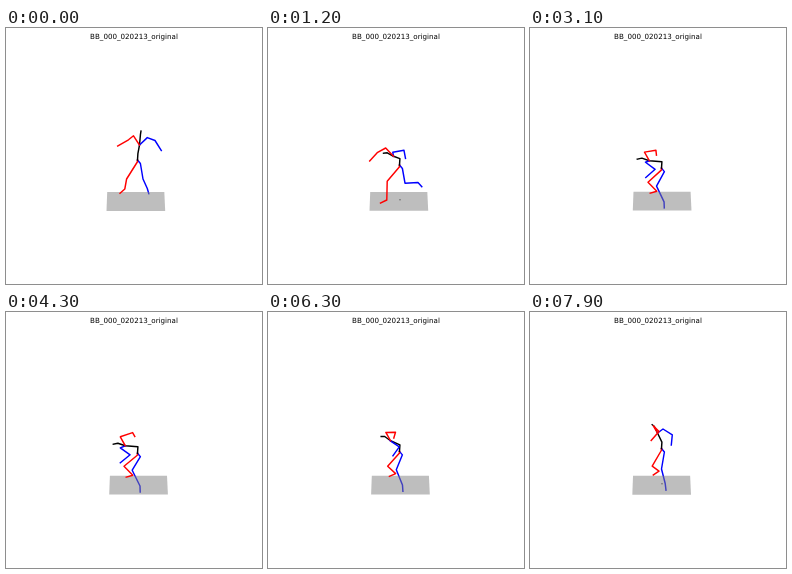
Animation of 256 by 256 pixels, one loop 8 s. Source, as an HTML page:

```html
<!DOCTYPE html>
<html lang="en">
<head>
<meta charset="utf-8">
<title>Skeleton motion</title>
<style>
  html, body { margin: 0; width: 100%; height: 100%; overflow: hidden; background: #fff; }
  svg { display: block; width: 100vw; height: 100vh; }
  text { font: 7.13px "DejaVu Sans", sans-serif; text-anchor: middle; }
  polyline { fill: none; stroke-width: 1.45; stroke-linejoin: round; stroke-linecap: square; }
  .left { stroke: #00f; }
  .right { stroke: #f00; }
  .mid { stroke: #000; }
</style>
</head>
<body>
<svg viewBox="0 0 256 256">
  <text x="128" y="10.6">BB_000_020213_original</text>
  <polyline id="leftLeg" class="left"/>
  <polygon id="ground" points="101.2,164.1 158.3,164.1 159.2,182.9 100.5,182.9" fill="#808080" fill-opacity=".51"/>
  <path id="trail" d="M131 171.8h2" stroke="#555" stroke-width=".7"/>
  <polyline id="rightLeg" class="right"/>
  <polyline id="torso" class="mid"/>
  <polyline id="leftArm" class="left"/>
  <polyline id="rightArm" class="right"/>
</svg>
<script>
const LOOP = 8000, STEP = 100;

// Neck hangs on the pelvis, head and arms on the neck; legs are in stage units.
// Arms run shoulder, elbow, hand; legs run knee, ankle, toe.
const stand = {
  pelvis: [131.5, 132], neck: [2, -15], head: [1.5, -14],
  rightArm: [-6, -9.2, -11, -5.2, -21.8, 1],
  leftArm: [7.8, -7.4, 15.5, -4.5, 21.8, 5.5],
  rightLeg: [120.6, 151, 118.8, 161, 114, 165.3],
  leftLeg: [137, 151, 141.3, 160.5, 142.8, 165.7]
};
const stride = {
  pelvis: [131.5, 137], neck: [-6, -8.7], head: [-10, -3],
  rightArm: [-7.8, -8.3, -16.3, -3.6, -23.8, 4.7],
  leftArm: [-0.7, -4, 10.5, -6, 12, 2.2],
  rightLeg: [119.2, 153.2, 118.8, 172, 112.5, 175],
  leftLeg: [137, 155.2, 150, 154.5, 153.8, 158.7]
};
const crouch = {
  pelvis: [131.5, 141.2], neck: [-12.2, -7.4], head: [-12, -1.6],
  rightArm: [-5, -9, 7.3, -13.2, 9.5, -9.3],
  leftArm: [-5, 2, 4.8, 9, -5, 17],
  rightLeg: [118, 154.3, 126.8, 163.2, 120.2, 165.2],
  leftLeg: [126.2, 158.2, 134, 174, 134.2, 180]
};
const rise = {
  pelvis: [131.5, 136.5], neck: [-4, -15.5], head: [-5.3, -8.3],
  rightArm: [-4.2, -7.2, 1.5, -1.5, -6.3, 7.5],
  leftArm: [5.5, -4, 14.8, 1.8, 13.8, 12],
  rightLeg: [122.2, 154.2, 129, 159.2, 123.3, 163],
  leftLeg: [131.5, 157, 135.2, 171.5, 136, 178.2]
};
const halfway = part => crouch[part].map((p, k) => (p + rise[part][k]) / 2);
const bend = {
  ...crouch, pelvis: rise.pelvis, rightArm: rise.rightArm,
  leftArm: halfway("leftArm"), leftLeg: halfway("leftLeg")
};

const times = [0, 1200, 2200, 3500, 4600, 7900];
const poses = [stand, stride, bend, crouch, crouch, rise];
const last = times.length - 1;

// Eased tangent that never overshoots a key pose.
function tangent(values, i) {
  const slope = j => (values[j + 1] - values[j]) / (times[j + 1] - times[j]);
  if (i === 0) return slope(0);
  if (i === last) return slope(last - 1);
  const a = slope(i - 1), b = slope(i);
  return a * b > 0 ? 2 * a * b / (a + b) : 0;
}

function sample(part, t) {
  const i = Math.max(0, times.findIndex(end => t <= end) - 1);
  const span = times[i + 1] - times[i], u = (t - times[i]) / span, v = 1 - u;
  return stand[part].map((_, k) => {
    const values = poses.map(pose => pose[part][k]);
    return values[i] * (1 + 2 * u) * v * v + values[i + 1] * u * u * (3 - 2 * u) +
      span * u * v * (v * tangent(values, i) - u * tangent(values, i + 1));
  });
}

const find = id => document.getElementById(id);
const shift = (points, [x, y]) => points.map((p, k) => p + (k % 2 ? y : x));
const line = (id, ...parts) => find(id).setAttribute("points", parts.flat().join(" "));

function draw(t) {
  const part = name => sample(name, t);
  const pelvis = part("pelvis"), neck = shift(part("neck"), pelvis);
  const [hx, hy] = part("head");
  const chin = [hx * .62, hy * .62 - 1.6];
  const spine = shift([.4, -6.4], pelvis);

  line("torso", shift([hx, hy, ...chin], neck), neck, spine, pelvis);
  line("rightArm", neck, shift(part("rightArm"), neck));
  line("leftArm", neck, shift(part("leftArm"), neck));
  line("rightLeg", pelvis, shift([-.2, 2], pelvis), part("rightLeg"));
  line("leftLeg", pelvis, shift([2.9, 3.5], pelvis), part("leftLeg"));

  const sway = 2.8 * Math.sin(Math.PI * t / 10200);
  find("ground").setAttribute("transform", `translate(${sway} ${-.13 * sway})`);
  const showTrail = t >= 7300 || (t >= 700 && t < 1800);
  find("trail").style.visibility = showTrail ? "visible" : "hidden";
}

function tick() {
  const t = performance.now() % LOOP;
  draw(Math.floor(t / STEP) * STEP);
  requestAnimationFrame(tick);
}
tick();
</script>
</body>
</html>
```
